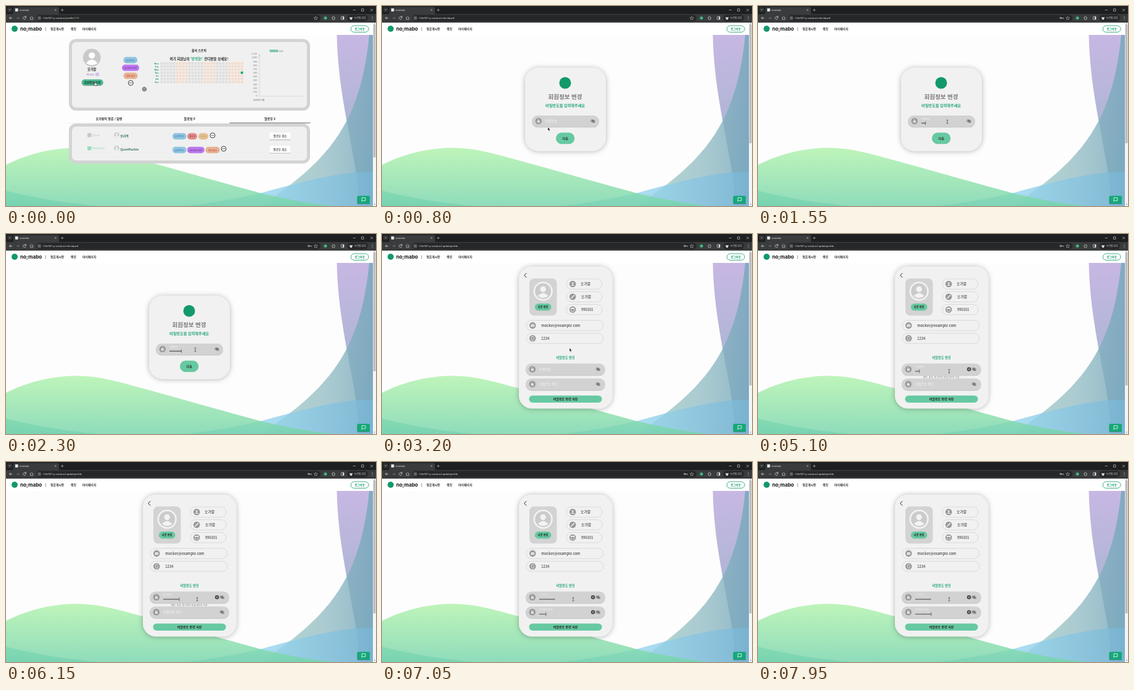
Write an HTML page that moves like this. It is 600 px wide and 325 px high and loops after 8 s.

```html
<!DOCTYPE html>
<html lang="ko">
<head>
<meta charset="utf-8">
<title>nomabo</title>
<style>
html, body { margin: 0; width: 100%; height: 100%; overflow: hidden; background: #fff; }
svg { display: block; width: 100vw; height: 100vh; }
text { font-family: "Noto Sans CJK KR", "Noto Sans", sans-serif; }
.ui { font-family: Roboto, sans-serif; }
.brand { font-family: Inter, sans-serif; font-weight: 700; }
</style>
</head>
<body>
<svg id="stage" viewBox="0 0 600 325" preserveAspectRatio="none"></svg>
<script>
const LOOP = 8000;
const GREEN = '#12996a', MINT = '#66c9a1', INK = '#222';

const rect = (x, y, x2, y2, fill, r = 0, extra = '') =>
  `<rect x="${x}" y="${y}" width="${x2 - x}" height="${y2 - y}" rx="${r}" fill="${fill}" ${extra}/>`;
const circle = (x, y, r, fill, extra = '') => `<circle cx="${x}" cy="${y}" r="${r}" fill="${fill}" ${extra}/>`;
const path = (d, fill, extra = '') => `<path d="${d}" fill="${fill}" ${extra}/>`;
const line = (d, color, width = 0.7, extra = '') =>
  path(d, 'none', `stroke="${color}" stroke-width="${width}" stroke-linecap="round" stroke-linejoin="round" ${extra}`);
const text = (x, y, s, size, fill = INK, extra = '') =>
  `<text x="${x}" y="${y}" font-size="${size}" fill="${fill}" ${extra}>${s}</text>`;
const MID = 'text-anchor="middle"', END = 'text-anchor="end"', BOLD = 'font-weight="700"';
const mid = (x, y, s, size, fill, extra = BOLD) => text(x, y, s, size, fill, `${MID} ${extra}`);
const group = (id, body, extra = '') => `<g id="${id}" ${extra}>${body}</g>`;
const at = (x, y, body) => `<g transform="translate(${x} ${y})">${body}</g>`;
const repeat = (n, fn) => Array.from({ length: n }, (_, i) => fn(i)).join('');

const avatar = (x, y, r, bg = '#c9c9c9', fg = '#fff') => at(x, y,
  circle(0, 0, r, bg) + circle(0, -r * 0.25, r * 0.36, fg) +
  path(`M${-r * 0.64} ${r * 0.6}Q0 ${-r * 0.15} ${r * 0.64} ${r * 0.6}Q0 ${r * 1.1} ${-r * 0.64} ${r * 0.6}`, fg));

const more = (x, y) => circle(x, y, 4, '#fff', 'stroke="#222" stroke-width=".9"') +
  [-1.8, 0, 1.8].map(d => circle(x + d, y, 0.65, INK)).join('');

const eye = (x, y) => at(x, y,
  line('M-3.2 0Q0 -4.2 3.2 0Q0 4.2 -3.2 0Z', '#444', 0.8) + circle(0, 0, 1.1, '#444') +
  line('M-2.6 -2.6L2.6 2.6', '#444', 0.8));

const clearIcon = (x, y) => circle(x, y, 3.3, '#444') +
  line(`M${x - 1.3} ${y - 1.3}l2.6 2.6m0 -2.6l-2.6 2.6`, '#d4d4d4', 0.8);

const icons = {
  lock: rect(-2, -0.8, 2, 2.6, '#eee', 0.4) + line('M-1.3 -.8V-1.8Q0 -4 1.3 -1.8V-.8', '#eee', 0.7) + circle(0, 0.9, 0.6, '#999'),
  person: circle(0, -1.3, 1.4, '#eee') + path('M-2.8 2.6Q0 -1.2 2.8 2.6Z', '#eee'),
  pen: line('M-2.3 2.3L2.1 -2.1', '#eee', 1.6),
  date: rect(-2.7, -2.5, 2.7, 2.8, 'none', 0.5, 'stroke="#eee" stroke-width=".7"') + rect(-2.7, -2.7, 2.7, -0.8, '#eee'),
  mail: rect(-2.9, -2.1, 2.9, 2.2, '#eee', 0.4) + line('M-2.7 -1.6L0 .3L2.7 -1.6', '#999', 0.6),
  phone: rect(-1.8, -3, 1.8, 3, 'none', 0.5, 'stroke="#eee" stroke-width=".8"')
};
const badge = (x, y, icon) => at(x, y, circle(0, 0, 5.3, '#999') + icons[icon]);

const pill = (x, y, x2, y2, label, size, fill, color = INK) =>
  rect(x, y, x2, y2, fill, (y2 - y) / 2) + mid((x + x2) / 2, (y + y2) / 2 + size * 0.36, label, size, color);

const tag = (x, y, x2, label, fill, color) =>
  rect(x, y - 5.2, x2, y + 5.2, fill, 5) +
  mid((x + x2) / 2, y + 1.6, label, 4.9, color, 'font-style="italic" class="ui"');
const tags = {
  python: (x, y) => tag(x, y, x + 22.5, 'python', '#8ec5e2', '#557b9e'),
  js: (x, y) => tag(x, y, x + 28, 'javascript', '#bd78ed', '#7040a4'),
  django: (x, y) => tag(x, y, x + 23, 'django', '#e6b390', '#cc5960'),
};

function backdrop() {
  return rect(0, 27, 600, 325, '#fdfdfd') +
    path('M536.5 47C538 140 562 220 570 290Q573 312 570 325H595V47Z', 'url(#violet)') +
    path('M589 47C575 190 525 250 413 325H595V47Z', 'url(#steel)') +
    path('M0 300Q70 318 150 325H290Q350 319 413 304C470 289 530 270 595 269V325H0Z', 'url(#sky)') +
    path('M0 258C40 238 80 230.5 115 230.5C150 230.5 180 239.5 215 249C285 268 350 287 413 304Q470 318 530 325H0Z', 'url(#hill)');
}

function chrome() {
  return rect(0, 0, 600, 13, '#1e1f20') + rect(0, 13, 600, 27, '#3a3b3c') +
    rect(2, 2, 10, 10, '#303132', 2.5) + line('M4.7 5.4L6 6.7L7.3 5.4', '#ccc') +
    path('M10 13Q12 13 12 10V4Q12 1.5 15 1.5H83Q86 1.5 86 4V10Q86 13 88 13Z', '#3a3b3c') +
    rect(15, 4, 19.5, 8.8, '#eee') + text(22, 8.4, 'nomabo', 4.2, '#e4e4e4', 'class="ui"') +
    line('M79 5.2l2.4 2.4m0 -2.4l-2.4 2.4M89.5 6.5h3.6m-1.8 -1.8v3.6', '#ccc', 0.6) +
    line('M563 6.5h3.5M591.3 4.8l3.4 3.4m0 -3.4l-3.4 3.4', '#ddd', 0.6) +
    rect(576.5, 4.8, 580, 8.2, 'none', 0, 'stroke="#ddd" stroke-width=".6"') +
    line('M10 19.5H5.5m2 -2l-2 2l2 2', '#ddd') + line('M17 19.5h4.5m-2 -2l2 2l-2 2', '#777') +
    line('M32.2 18.2A2.4 2.4 0 1 0 32.3 20.6M32.4 16.6V18.5H30.5', '#ddd') +
    line('M42.2 19.5L45 17L47.8 19.5M43.2 19V22H46.8V19', '#ddd', 0.6, 'transform="translate(-3.5 0)"') +
    rect(49, 14.5, 510, 24.7, '#262728', 5) + circle(54, 19.6, 3.8, '#3a3b3c') +
    line('M52.2 18.4h3.6M52.2 20.8h3.6', '#ddd', 0.6) +
    '<text id="url" x="60" y="21.3" font-size="4.4" fill="#e2e2e2" class="ui"></text>' +
    group('passKey', circle(490.8, 19.5, 1.2, 'none', 'stroke="#ddd" stroke-width=".8"') + line('M492 19.5h3v1.1', '#ddd', 0.8)) +
    path('M502.3 16.8l.9 1.9l2.1 .2l-1.6 1.4l.5 2l-1.9 -1l-1.9 1l.5 -2l-1.6 -1.4l2.1 -.2Z', 'none', 'stroke="#ddd" stroke-width=".5"') +
    circle(518, 19.5, 2.5, '#42b883') + rect(529, 17.8, 533, 21.8, 'none', 0.5, 'stroke="#ddd" stroke-width=".7"') +
    rect(543.5, 17.2, 548, 21.8, 'none', 0.4, 'stroke="#ddd" stroke-width=".7"') + rect(546, 17.2, 548, 21.8, '#ddd') +
    rect(553.5, 14.4, 587, 24.7, '#262728', 5) + circle(559.5, 20.4, 1.9, '#ddd') + line('M556.8 18.7h5.4', '#ddd', 0.8) +
    text(564.5, 21.2, '시크릿 모드', 4.1, '#e4e4e4') +
    [17.3, 19.5, 21.7].map(y => circle(594, y, 0.55, '#ddd')).join('');
}

function header() {
  return rect(0, 27, 595, 47, '#fff') + circle(14, 37, 5, GREEN) +
    text(23, 40, 'no;mabo', 8.2, '#181818', 'class="brand"') +
    line('M64.3 35V40', '#a6715c', 0.8) +
    [[72, '질문게시판'], [105, '랭킹'], [124, '마이페이지']].map(([x, s]) => text(x, 39.2, s, 4.85, '#333', BOLD)).join('') +
    rect(559.3, 32, 588, 42.5, '#fff', 5.2, `stroke="${GREEN}" stroke-width=".8"`) +
    mid(573.6, 38.9, '로그아웃', 4.6, GREEN);
}

function profile() {
  const days = ['Mon', 'Tue', 'Wed', 'Thu', 'Fri', 'Sat', 'Sun'];
  const panel = (y, y2) => rect(104.5, y + 2.5, 490.5, y2 - 2.5, '#f0f0f0', 9, 'stroke="#d3d3d3" stroke-width="5"');
  const grid = days.map((d, j) =>
    text(247.5, 94.6 + j * 5.05, d, 3.3, GREEN, `${END} ${BOLD}`) +
    repeat(27, i => rect(250.6 + i * 5, 91.3 + j * 5.05, 254.5 + i * 5, 95.2 + j * 5.05,
      i === 26 && j === 3 ? '#18a873' : Math.floor(i / 4.35) % 2 ? '#f3dccb' : '#dedede', 0.3))).join('');
  const chart = line('M411 78V146.5H481', '#c6c6c6', 0.5) +
    repeat(12, i => text(407, 79.2 + i * 6.18, i === 11 ? '0' : i ? (11 - i) * 100 : '1,100', 3.7, '#777', END) +
      line(`M409 ${78 + i * 6.18}h2`, '#ccc', 0.4)) +
    rect(428, 71.3, 441, 74.5, '#80ceb1', 0, 'stroke="#37a982" stroke-width=".5"') +
    text(443, 74.5, 'EXP', 3.7, '#777') + circle(411, 81, 0.8, '#63bc99') +
    mid(410, 153.5, '2024년 2월', 3.8, '#666', '');
  const row = (y, rank, color, name, list) =>
    rect(132, y - 4, 138.5, y + 2.5, color, 1) + text(139.5, y + 1.2, rank, 5.2, color, 'class="ui"') +
    avatar(179.5, y - 0.8, 4.1) + text(185.3, y + 2.8, name, 4.9, '#38775f', BOLD) + list +
    rect(427.4, y - 4.8, 461.5, y + 6.5, '#fff', 1.6, 'filter="url(#soft)"') +
    mid(444.5, y + 2.6, '팔로우 취소', 4.5, '#555');
  return panel(53.5, 170) + avatar(139.2, 84, 14.4) +
    mid(139.2, 104.7, '오가람', 5.2) +
    text(130.5, 113.4, 'Ruby', 6, '#a98fd0', 'class="ui" font-style="italic"') + rect(145, 108.3, 151, 114, '#d3c3ea', 1) +
    rect(122.6, 119.2, 157.6, 129, '#4cb890', 4.9, 'filter="url(#soft)"') + mid(140, 125.7, '회원정보 수정', 4.7, '#163c2e') +
    tags.python(190.5, 88) + tags.js(188, 100.4) + tags.django(190.5, 113.4) + more(202.3, 125) +
    circle(224.3, 135.2, 3, 'none', 'stroke="#222" stroke-width="1.2" stroke-dasharray="1.5 .6"') + circle(224.3, 135.2, 1.4, 'none', 'stroke="#222" stroke-width=".8"') +
    mid(313, 73.8, '출석 스트릭', 4.9) +
    mid(313, 88.2, `여기 회원님의 <tspan fill="${GREEN}">‘빈약한!’</tspan> 잔디밭을 보세요!`, 5.5) +
    grid + chart +
    mid(167, 185, '오가람의 질문 / 답변', 5) + mid(297.7, 185, '팔로워 0', 5) + mid(428, 185, '팔로잉 2', 5) +
    line('M102 190.2H363', '#ddd', 0.5) + line('M363 190H493', '#333', 0.8) +
    panel(191, 256) +
    row(210.5, 'Silver', '#c6c9ca', '보리싹', tags.python(270, 211.8) + tag(294, 211.8, 310, 'java', '#df8b8b', '#9c4055') +
      tag(312, 211.8, 328, 'c++', '#e9bd90', '#69b76a') + more(335, 210.3)) +
    row(232, 'Platinum', '#a0dcbf', 'QuietMarble', tags.python(270, 234) + tags.js(293.8, 234) + tags.django(323.5, 234) + more(353, 232));
}

const field = (id, x, y, x2, y2, label, eyeX) => {
  const cy = (y + y2) / 2;
  return rect(x, y, x2, y2, '#d2d2d2', (y2 - y) / 2, 'filter="url(#soft)"') + badge(x + 10.8, cy - 0.2, 'lock') +
    `<text id="${id}Label" x="${x + 22}" fill="#f5f5f5">${label}</text><g id="${id}Dots"></g>` +
    line(`M${x + 22} ${cy + 0.6}v5`, '#222', 0.6, `id="${id}Caret"`) + eye(eyeX, cy - 0.1) +
    group(id + 'Clear', clearIcon(eyeX - 8.3, cy - 0.1));
};

const card = (x, y, x2, y2, r) => rect(x, y, x2, y2, '#f1f1f1', r, 'filter="url(#shadow)"');

function check() {
  return card(232, 100.5, 363, 235.5, 22) + circle(297, 125, 9.5, GREEN) +
    mid(297, 151.3, '회원정보 변경', 9.5, '#7a7a7a') +
    mid(297, 163.6, '비밀번호를 입력해주세요', 6.15, '#27a779') +
    field('check', 243, 178, 352, 196.3, '비밀번호', 342.3) +
    pill(282, 205.8, 312.3, 224.2, '다음', 5, MINT);
}

function update() {
  const input = (x, y, x2, icon, value, tx) =>
    rect(x, y, x2, y + 16.7, '#f1f1f1', 8.3, 'stroke="#d2d2d2" stroke-width=".8"') +
    badge(x + 10.2, y + 8.3, icon) + text(tx, y + 10.4, value, 5.9, '#222', 'font-weight="500"');
  return card(222, 53, 373.5, 283.5, 21) + line('M234 63.8L230.7 67.2L234 70.6', '#222', 1) +
    rect(239, 72.3, 283.5, 132.5, '#d3d3d3', 7.5) + circle(261.2, 93, 15.6, '#f3f3f3') + avatar(261.2, 93, 13, '#cbcbcb', '#f3f3f3') +
    pill(247.8, 113, 274.5, 124.5, '사진 변경', 4.2, MINT) +
    input(299, 73, 357, 'person', '오가람', 322) + input(299, 93.7, 357, 'pen', '오가람', 323) +
    input(299, 114.4, 357, 'date', '990101', 323) +
    input(234, 140.3, 358.8, 'mail', 'mocker@example.com', 258.3) + input(234, 161.2, 358.8, 'phone', '1234', 258.3) +
    mid(297.5, 203, '비밀번호 변경', 5.2, '#27a779') +
    field('first', 233, 210.5, 361.8, 229.3, '비밀번호', 350.5) +
    group('hint', mid(297, 234.3, '영문, 숫자, 특수문자 조합 8자리 이상', 3.85, '#777', '')) +
    field('second', 233, 234.7, 361.8, 253.5, '비밀번호 확인', 350.5) +
    pill(238.5, 262.4, 356.6, 273.9, '비밀번호 변경 저장', 5, MINT);
}

const gradient = (id, dir, ...stops) => `<linearGradient id="${id}" ${dir}>` +
  stops.map(([o, c, a = 1]) => `<stop offset="${o}" stop-color="${c}" stop-opacity="${a}"/>`).join('') + '</linearGradient>';
const DOWN = 'x1="0" y1="0" x2="0" y2="1"', ACROSS = 'x1="0" x2="1"';
const shadow = (id, dy, blur, a) => `<filter id="${id}" x="-20%" y="-30%" width="140%" height="170%">
  <feDropShadow dx="0" dy="${dy}" stdDeviation="${blur}" flood-opacity="${a}"/></filter>`;

document.getElementById('stage').innerHTML = '<defs>' +
  gradient('hill', DOWN, [0, '#aff2aa', 0.8], [1, '#73d3aa', 0.8]) +
  gradient('violet', DOWN, [0, '#c7b7e3'], [0.5, '#b0b6d6'], [1, '#94b6cc']) +
  gradient('steel', ACROSS, [0, '#9acbc0', 0.7], [0.6, '#86b4bd', 0.7], [1, '#73a6ba', 0.8]) +
  gradient('sky', ACROSS, [0, '#72cbc4', 0.8], [0.7, '#96d5ef', 0.8], [1, '#78b7d8', 0.7]) +
  shadow('soft', 0.8, 0.6, 0.35) + shadow('shadow', 0.6, 4.5, 0.3) + '</defs>' +
  backdrop() + header() + group('profile', profile()) + group('check', check()) + group('update', update()) +
  rect(569.5, 308.5, 590, 321, '#12a878', 1.5, 'filter="url(#soft)"') +
  path('M577 311.6H582.8V316.3H578.4L577 317.8Z', 'none', 'stroke="#fff" stroke-width=".8"') +
  rect(595, 27, 600, 325, '#f4f4f4') + '<rect id="thumb" x="595.6" y="30" width="3.8" rx=".6" fill="#bdbdbd"/>' +
  path('M596.3 29.2L597.6 27.5L598.9 29.2ZM596.3 321.5L597.6 323.2L598.9 321.5Z', '#888') +
  chrome() +
  group('pointer',
    group('arrow', path('M0 0V5.4L1.3 4.2L2.3 6.3L3.2 5.9L2.2 3.8H4Z', '#111', 'stroke="#fff" stroke-width=".4"')) +
    group('hand', path('M-.6 -2.2Q0 -3 .6 -2.2V.3L2.8 .9Q3.4 1.2 3.2 2.2L2.6 4.3H-.6L-2.4 1.6Q-2 .8 -.6 1.8Z', '#fff', 'stroke="#111" stroke-width=".6"')) +
    group('beam', line('M-1.1 -2.8Q0 -2.8 0 -2.2Q0 -2.8 1.1 -2.8M0 -2.2V2.2M-1.1 2.8Q0 2.8 0 2.2Q0 2.8 1.1 2.8', '#222', 0.6)));

const $ = id => document.getElementById(id);
const show = (id, on) => $(id).setAttribute('display', on ? 'inline' : 'none');

const PAGES = [
  { id: 'profile', from: 0, url: 'profile/111', thumb: 216 },
  { id: 'check', from: 350, url: 'checkpwd', thumb: 193 },
  { id: 'update', from: 2650, url: 'updateprofile', thumb: 216 }
];
// Each entry: time, x, y
const TRAIL = [[0, 144.5, 125], [250, 144.5, 125], [780, 268.5, 197.3], [1100, 307, 188], [2550, 307, 188],
  [2900, 304, 185.5], [3600, 304, 185.5], [4250, 310, 223]];
const FIELDS = [
  { id: 'check', x: 265, y: 187.2, focus: 1150, blur: 2650, start: 1200, step: 108, max: 9 },
  { id: 'first', x: 255, y: 219.9, focus: 4350, blur: 6380, start: 4750, step: 115, max: 12, clear: true },
  { id: 'second', x: 255, y: 244.1, focus: 6380, blur: LOOP, start: 6450, step: 110, max: 12, clear: true }
];
const PITCH = 2.13;
const clamp = (v, a, b) => Math.min(b, Math.max(a, v));

function pointerAt(t) {
  const i = TRAIL.findIndex(p => p[0] > t);
  if (i < 0) return TRAIL[TRAIL.length - 1].slice(1);
  const [a, b] = [TRAIL[i - 1], TRAIL[i]];
  const k = (t - a[0]) / (b[0] - a[0]), e = k * k * (3 - 2 * k);
  return [a[1] + (b[1] - a[1]) * e, a[2] + (b[2] - a[2]) * e];
}

function drawField(f, t) {
  const n = clamp(Math.floor((t - f.start) / f.step), 0, f.max);
  const lift = clamp((t - f.focus) / 150, 0, 1);
  const label = $(f.id + 'Label');
  label.setAttribute('y', f.y + 2 - 4.7 * lift);
  label.setAttribute('font-size', 5.2 - 1.4 * lift);
  label.setAttribute('opacity', t > f.blur ? 0.65 : 1);
  $(f.id + 'Dots').innerHTML = repeat(n, i => circle(f.x + 1 + i * PITCH, f.y + 3.2, 0.78, '#222'));
  $(f.id + 'Caret').setAttribute('transform', `translate(${n * PITCH + 0.3} 0)`);
  show(f.id + 'Caret', t >= f.focus && t < f.blur);
  show(f.id + 'Clear', f.clear && n > 0);
}

function render(t) {
  const page = PAGES.filter(p => t >= p.from).pop();
  PAGES.forEach(p => show(p.id, p === page));
  $('url').textContent = 'i10e507.p.ssafy.io/' + page.url;
  $('thumb').setAttribute('height', page.thumb);
  show('passKey', t >= 1000);
  show('hint', t >= 4865 && t < 6250);
  FIELDS.forEach(f => drawField(f, t));

  const [x, y] = pointerAt(t);
  const beam = page.id === 'check' ? y > 178 && y < 196.5 && x > 260 && x < 337
    : page.id === 'update' && y > 210.5;
  const hand = page.id === 'profile' && t < 300;
  $('pointer').setAttribute('transform', `translate(${x} ${y})`);
  show('beam', beam);
  show('hand', hand);
  show('arrow', !beam && !hand);
}

const begin = performance.now();
function tick() {
  render((performance.now() - begin) % LOOP);
  requestAnimationFrame(tick);
}
render(0);
requestAnimationFrame(tick);
</script>
</body>
</html>
```
